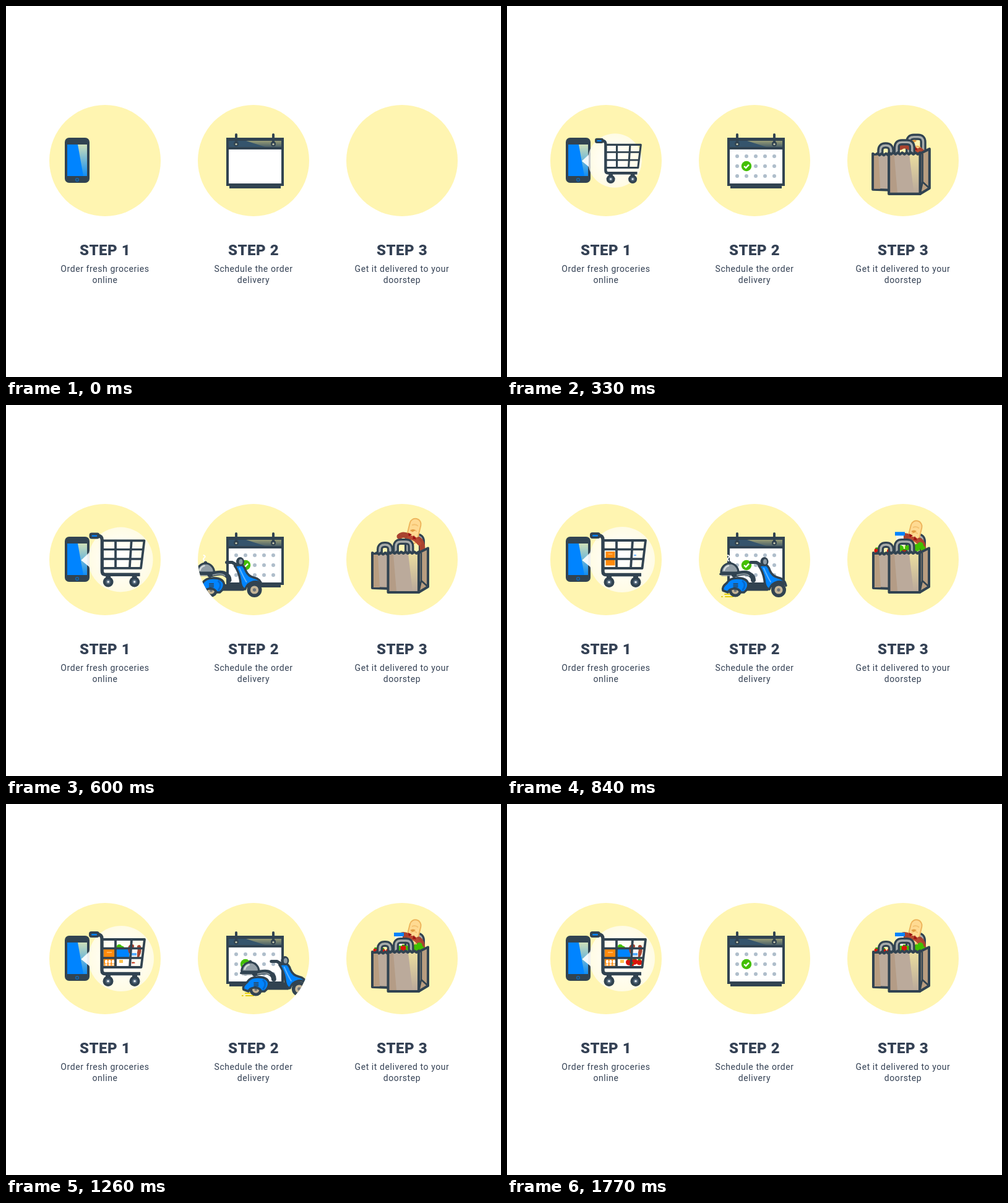
Write an HTML page with a canvas that moves like this. It is 800 by 600 pixels and loops after 1.8 s.

```html
<!DOCTYPE html>
<html lang="en">
<head>
<meta charset="utf-8">
<title>Three steps</title>
<style>
html, body { margin: 0; width: 100%; height: 100%; overflow: hidden; background: #fff; }
#stage { position: relative; width: 800px; height: 600px; overflow: hidden; }
canvas { position: absolute; left: 0; top: 0; }
.step { position: absolute; top: 381px; width: 200px; text-align: center; color: #344154; font-family: Roboto, sans-serif; }
.step h2 { margin: 0 0 7px; font-size: 24px; line-height: 28px; font-weight: 900; letter-spacing: 0.5px; }
.step p { margin: 0; font-size: 14px; line-height: 18px; letter-spacing: 0.58px; }
</style>
</head>
<body>
<div id="stage">
  <canvas id="view" width="800" height="600"></canvas>
  <div class="step" style="left:60px"><h2>STEP 1</h2><p>Order fresh groceries<br>online</p></div>
  <div class="step" style="left:300px"><h2>STEP 2</h2><p>Schedule the order<br>delivery</p></div>
  <div class="step" style="left:540px"><h2>STEP 3</h2><p>Get it delivered to your<br>doorstep</p></div>
</div>
<script>
const c = document.getElementById('view').getContext('2d');
const LOOP = 1800, TICK = 30;
const DARK = '#314351', BLUE = '#0084ff', YELLOW = '#fff5b1', GREEN = '#43bf00',
  RED = '#d9150b', BROWN = '#a9432f', TAN = '#b89d80', PAPER = '#bbaa9b', GREY = '#a9adab';

const span = (t, start, len) => Math.min(1, Math.max(0, (t - start) / len));
const easeOut = (u, n) => 1 - Math.pow(1 - u, n);
const back = (u, k = 1.7) => u <= 0 ? 0 : 1 + (k + 1) * Math.pow(u - 1, 3) + k * Math.pow(u - 1, 2);

function shape(d, fill, stroke, width = 4) {
  const p = new Path2D(d);
  if (fill) { c.fillStyle = fill; c.fill(p); }
  if (stroke) { c.strokeStyle = stroke; c.lineWidth = width; c.stroke(p); }
}
function rect(x, y, w, h, fill, r = 0) {
  c.beginPath();
  c.roundRect(x, y, w, h, r);
  c.fillStyle = fill;
  c.fill();
}
function disc(x, y, r, fill, ry = r) {
  c.beginPath();
  c.ellipse(x, y, r, ry, 0, 0, 7);
  c.fillStyle = fill;
  c.fill();
}
function fade(y0, y1, from, to) {
  const g = c.createLinearGradient(0, y0, 0, y1);
  g.addColorStop(0, from);
  g.addColorStop(1, to);
  return g;
}
function scaled(x, y, s, draw) {
  if (s <= 0.001) return;
  c.save();
  c.translate(x, y);
  c.scale(s, s);
  c.translate(-x, -y);
  draw();
  c.restore();
}
function shifted(x, y, draw) {
  c.save();
  c.translate(x, y);
  draw();
  c.restore();
}

// Step 1
function phone() {
  rect(95, 213, 40, 73, DARK, 7);
  rect(99, 224, 32, 51, BLUE);
  shape('M116 224H131V275H125Z', fade(224, 275, '#cfe0b8', '#0f8df5'));
  c.beginPath();
  c.arc(115, 281, 2.4, 0, 7);
  c.strokeStyle = '#0b68bd';
  c.lineWidth = 1.3;
  c.stroke();
}
function bubble() {
  const g = c.createRadialGradient(184, 246, 5, 186, 250, 53);
  g.addColorStop(0, '#ffffff');
  g.addColorStop(1, 'rgba(255,255,255,0.66)');
  c.beginPath();
  c.moveTo(121.5, 251);
  c.arc(186, 250, 53, Math.PI + 0.22, 3 * Math.PI - 0.22);
  c.closePath();
  c.fillStyle = g;
  c.fill();
  shape('M121.5 251L135 239.5V262Z', 'rgba(255,255,255,0.75)');
}
function tomato(x, y, r) {
  disc(x, y, r, RED);
  shape(`M${x - 2.5} ${y - r}l2.5 2 2.5 -2 -1 -1h-3z`, '#2f9a00');
}
function groceries(t) {
  const pop = start => back(span(t, start, 200), 1.2);
  scaled(167, 247, pop(780), () => {
    rect(158, 235, 18, 27, '#ff8a0d');
    rect(163, 239, 8, 2, '#ffb65c');
  });
  scaled(167, 257, pop(1000), () => {
    for (const x of [162, 167.5, 173]) disc(x, 255, 2.2, '#fff', 3);
    rect(158, 258, 18, 4, '#ffa544');
    for (const x of [162, 167.5, 173]) disc(x, 260, 1.4, '#fff');
  });
  scaled(185, 233, pop(940), () => {
    disc(183, 231, 4, GREEN);
    disc(187, 234, 4.5, GREEN);
    disc(181, 235, 3, '#33a000');
  });
  scaled(189, 245, pop(1020), () => {
    rect(179, 235, 20, 13, BLUE);
    rect(181, 250, 15, 12, '#fff');
    rect(183, 252, 6, 5, '#ffc34d');
  });
  scaled(212, 240, pop(1170), () => {
    c.lineCap = 'round';
    shape('M204 230Q198 230 201 239M215 231Q217 238 213 245', null, BROWN, 6);
    c.lineCap = 'butt';
  });
  scaled(207, 243, pop(815), () => {
    rect(202, 234, 10, 18, '#f7f8f8', 3);
    rect(203, 241, 8, 4, '#58adff');
  });
  scaled(206, 257, pop(1250), () => {
    tomato(197, 256, 5);
    tomato(206, 255, 5);
    tomato(214, 256, 4.5);
    tomato(202, 260, 3);
  });
}
function cart(t) {
  groceries(t);
  c.lineJoin = 'round';
  shape('M155 219H224L218.5 264H155M177 219V264M203 219L200 264', null, DARK, 3.8);
  shape('M155 233.5H222M155 249H220', null, DARK, 3.4);
  shape('M148 211Q155 211 155 218V269Q155 274.5 160 274.5H217', null, DARK, 5.4);
  rect(134, 206, 17, 10, DARK, 4);
  rect(138, 210, 9, 2.4, BLUE, 1);
  for (const x of [165, 208]) {
    rect(x - 4, 274, 8, 9, DARK);
    disc(x, 286.5, 8.5, DARK);
    disc(x, 286.5, 4, '#52677a');
    disc(x, 286.5, 1.8, '#e8edf0');
  }
}
function stepOne(t) {
  const s = easeOut(span(t, 30, 850), 4);
  phone();
  scaled(119, 250, s, bubble);
  scaled(180, 250, s, () => cart(t));
}

// Step 2
function calendar(t) {
  rect(356, 213, 93, 78, DARK);
  rect(361, 290, 83, 5, DARK);
  rect(360, 218, 85, 10, '#35546c');
  shape('M388 218H445V228H419Z', fade(218, 228, '#989d76', '#4a6069'));
  rect(360, 232, 85, 55, '#fff');
  for (const x of [372, 432]) {
    rect(x - 2, 206, 4, 17, DARK, 2);
    disc(x, 223, 4, DARK);
    disc(x, 223.5, 1.6, '#c9cbb0');
  }
  for (let i = 0; i < 15; i++) {
    if (i === 6) continue;
    const x = 372 + i % 5 * 15, y = 243 + Math.floor(i / 5) * 16;
    scaled(x, y, back(span(t, 30 + i * 10, 120)), () => disc(x, y, 3, '#afbecb'));
  }
  scaled(387, 259, back(span(t, 170, 150)), () => {
    disc(387, 259, 8.2, GREEN);
    shape('M383.2 259.2L386 261.8L391 256.6', null, '#fff', 2.4);
  });
}
function wheel(x, y, r) {
  disc(x, y, r, DARK);
  disc(x, y, r * 0.55, '#c5b597');
  disc(x, y, r * 0.22, '#6d747a');
}
function scooter() {
  c.lineJoin = c.lineCap = 'round';
  shape('M347 310H348M353 310H365M352 306H360', null, '#e6cf14', 2);
  shape('M358 252Q355 249 358 247T357 243', null, '#fff', 2);
  // serving dome
  shape('M346 271A14 15 0 0 1 374 271Z', '#929ea6', DARK, 3.2);
  shape('M351 267Q353 261 358 260', null, '#d7dcdd', 2.4);
  disc(360, 255, 2.6, DARK);
  shape('M345 273.5H376', null, DARK, 3.6);
  shape('M347 276H372', null, '#8c979d', 1.4);
  wheel(369, 300, 10.5);
  // floor, seat and rear body
  shape('M388 288Q394 295 402 290H416L421 299H386Z', DARK, DARK, 3);
  shape('M367 275Q386 269 392 274Q398 277 398 283', null, DARK, 8);
  shape('M372 275Q386 271 391 276', null, '#8a969d', 2);
  shape('M349 300Q347 294 355 288Q360 280 371 280Q388 279 390 290Q390 298 383 303H378Q374 296 366 297Q359 298 357 303Z', BLUE, DARK, 3.6);
  shape('M381 285Q387 291 381 299', null, '#0669ce', 3);
  shape('M366 289H373M366 291.5H373M366 294H373', null, DARK, 1.3);
  // front
  wheel(439, 299, 12);
  shape('M407 260Q414 270 416 283Q417 297 424 298Q428 288 437 286Q446 284 451 292Q449 281 438 279Q429 277 425 268Q422 258 416 258Z', BLUE, DARK, 3.6);
  shape('M415 264Q421 278 426 286', null, '#5bb2ff', 2);
  shape('M394 254.5H403L409 258', null, DARK, 5);
  disc(416, 253.5, 6.5, DARK, 7.5);
  disc(417, 253.5, 3, '#8e9ca6', 4.3);
  c.lineCap = 'butt';
}
function stepTwo(t) {
  calendar(t);
  const enter = span(t, 400, 400), leave = span(t, 1090, 353);
  if (enter === 0 || leave === 1) return;
  c.save();
  c.beginPath();
  c.arc(400, 250, 90, 0, 7);
  c.clip();
  c.translate(150 * (leave * leave - Math.pow(1 - enter, 2)), 0);
  scooter();
  c.restore();
}

// Step 3
function handle(x0, x1, top) {
  const d = `M${x0} 241V${top + 8}Q${x0} ${top} ${x0 + 8} ${top}H${x1 - 8}Q${x1} ${top} ${x1} ${top + 8}V241`;
  shape(d, null, DARK, 10);
  shape(d, null, GREY, 3.4);
}
function zigzag(x0, x1, y, n) {
  const w = (x1 - x0) / n / 2;
  return `M${x0} ${y}` + `l${w} 2.5l${w} -2.5`.repeat(n);
}
function baguette() {
  c.save();
  c.translate(659, 207);
  c.rotate(0.24);
  rect(-10, -21, 20, 44, '#eeb55c', 10);
  rect(-8, -19, 16, 40, '#ffda92', 8);
  shape('M-5 -8Q0 -12 5 -9M-5 2Q0 -3 5 0', null, '#f5c473', 2);
  c.restore();
}
function sausages() {
  c.lineCap = 'round';
  shape('M636 214Q642 209 650 214M667 219Q673 223 673 235', null, BROWN, 9);
  shape('M652 216Q660 215 668 225', null, '#b94a32', 7);
  c.lineCap = 'butt';
  shape('M650 208L656 211L651 214ZM659 212L663 219L657 218Z', '#9d1111');
  shape('M653 204Q658 201 662 204L657 207Z', '#e29b43');
}
function food(t) {
  const rise = (start, from, draw) => {
    const u = span(t, start, 400);
    if (u > 0) shifted(0, from * (1 - back(u)), draw);
  };
  rise(320, 45, baguette);
  rise(290, 25, sausages);
  rise(620, 28, () => {
    rect(629, 213, 12, 24, '#f3f4ec');
    rect(627, 208, 16, 6, BLUE);
  });
  rise(590, 22, () => {
    for (const [x, y, r] of [[668, 229, 5], [662, 233, 6], [636, 234, 5], [647, 233, 4], [672, 234, 4]]) disc(x, y, r, GREEN);
  });
  rise(640, 18, () => {
    tomato(597.5, 237, 4);
    tomato(618, 238, 4);
  });
  rise(760, 18, () => {
    tomato(609, 238, 4);
    tomato(642, 233, 4.5);
  });
}
function bags(t) {
  c.lineJoin = 'round';
  handle(649, 672, 212.5);
  food(t);
  handle(604, 621, 226);
  shape(zigzag(592, 620, 239, 4) + 'V297L592 296Z', PAPER, DARK);
  shape('M594 242H601L604 295H594Z', TAN);
  handle(630, 654.5, 221);
  shape('M667 239L682 231.5V294L667 303Z', TAN, DARK);
  shape('M667 303L671 284L682 294M671 239V284', null, DARK, 2.6);
  shape(zigzag(617.5, 667, 237.5, 7) + 'V303H617.5Z', PAPER);
  shape('M618 241H626L631 301H618Z', '#b49c86');
  shape('M650 240H666V301H657Z', fade(240, 301, '#eadd9f', '#bbaa9b'));
  shape(zigzag(617.5, 667, 237.5, 7) + 'V303H617.5Z', null, DARK);
}
function stepThree(t) {
  scaled(637, 255, back(span(t, 30, 360), 1), () => bags(t));
}

function paint(now) {
  const t = Math.floor(now % LOOP / TICK) * TICK;
  c.fillStyle = '#fff';
  c.fillRect(0, 0, 800, 600);
  for (const x of [160, 400, 640]) disc(x, 250, 90, YELLOW);
  stepOne(t);
  stepTwo(t);
  stepThree(t);
}
const begin = performance.now();
function loop() {
  paint(performance.now() - begin);
  requestAnimationFrame(loop);
}
loop();
</script>
</body>
</html>
```
